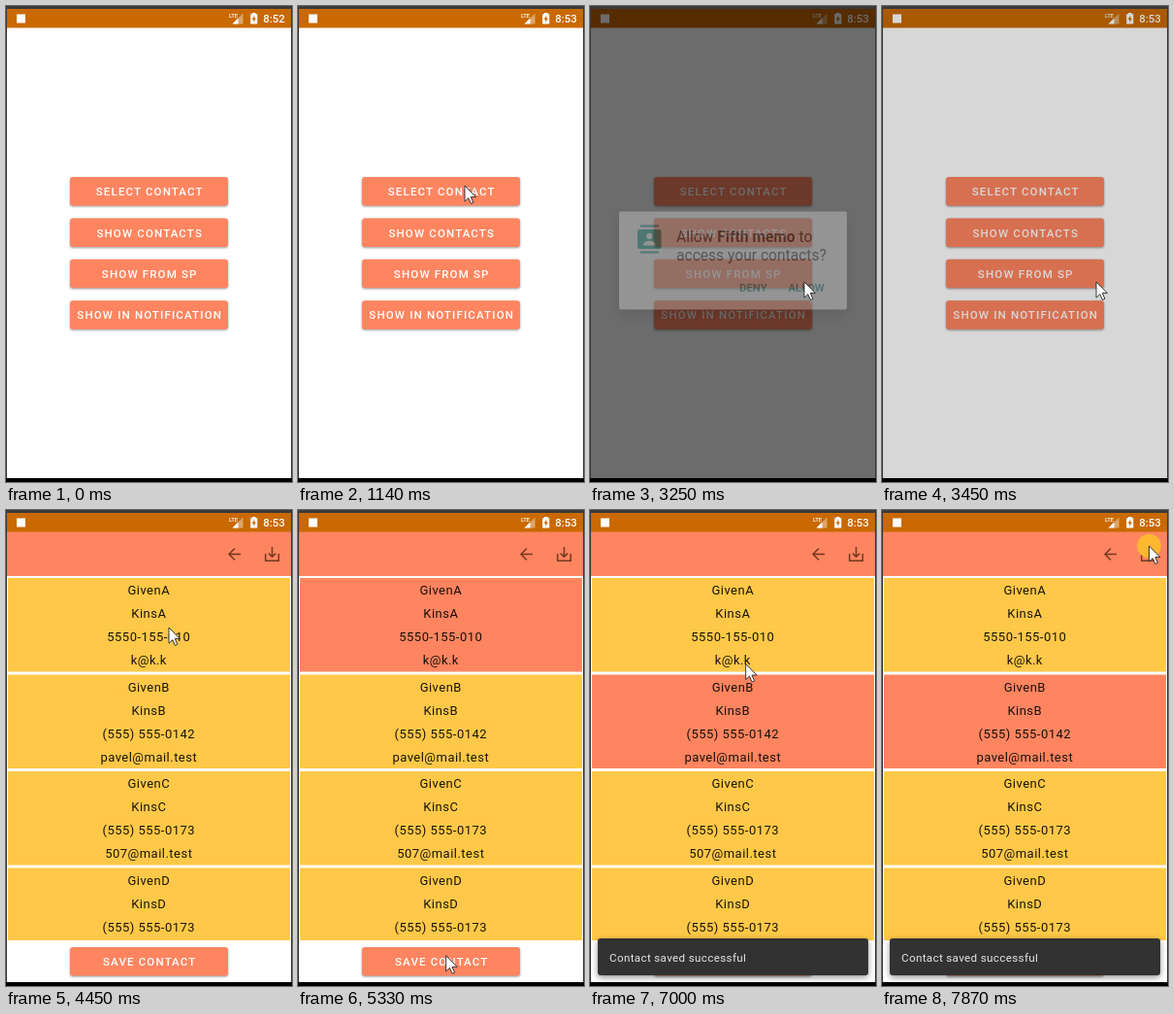
An HTML page that plays this animation: 295 px wide and 490 px high, repeating every 8 s.

```html
<!DOCTYPE html>
<html lang="en">
<head>
<meta charset="utf-8">
<title>Contact picker</title>
<style>
  html, body { margin: 0; width: 100%; height: 100%; overflow: hidden; background: #fff; }
  svg { display: block; width: 295px; height: 490px; font-family: Roboto, "Open Sans", sans-serif; }
  .btn rect { fill: #ff8560; filter: drop-shadow(0 1.2px 1px rgba(0, 0, 0, .4)); }
  .btn text { fill: #fff; font-size: 11.5px; font-weight: 500; letter-spacing: 1.16px; text-anchor: middle; }
  .row text { fill: #000; fill-opacity: .9; font-size: 13px; letter-spacing: .48px; text-anchor: middle; }
  .ask { font-size: 15.6px; fill: #212121; }
  .ask tspan { font-weight: 700; }
  .act { font-size: 11.3px; font-weight: 500; fill: #00857a; }
  .panel { fill: #fff; filter: drop-shadow(0 6px 7px rgba(0, 0, 0, .35)); }
  .bar { fill: #323232; filter: drop-shadow(0 2px 3px rgba(0, 0, 0, .45)); }
  .icon { fill: none; stroke: #74381f; stroke-width: 1.5; }
</style>
</head>
<body>
<svg viewBox="0 0 295 490">
  <defs>
    <clipPath id="listClip"><rect y="68" width="295" height="375"/></clipPath>
    <clipPath id="topClip"><rect x="66" y="176" width="163" height="29.5" rx="3"/></clipPath>
    <clipPath id="saveClip"><rect x="66" y="450" width="163" height="29.5" rx="3"/></clipPath>
  </defs>
  <rect width="295" height="490" fill="#fff"/>

  <g id="home">
    <g id="menu"></g>
    <g clip-path="url(#topClip)"><circle id="topRipple" cx="172" cy="185" fill="#fff"/></g>
  </g>

  <g id="contacts">
    <rect y="22" width="295" height="46" fill="#ff8560"/>
    <path class="icon" d="M242 45.5H230M236 39.5L230 45.5L236 51.5"/>
    <path class="icon" d="M267.7 45V52.3H281.3V45M274.5 38V48M270.8 44.6L274.5 48.3L278.2 44.6"/>
    <g id="list" clip-path="url(#listClip)"></g>
    <g id="save"></g>
    <g clip-path="url(#saveClip)"><circle id="saveRipple" cx="149" cy="466" fill="#fff"/></g>
    <g id="snack">
      <rect class="bar" x="8" y="441" width="279" height="38" rx="3"/>
      <text x="20" y="464.6" fill="#e6e6e6" font-size="11.6" letter-spacing=".36">Contact saved successful</text>
    </g>
  </g>

  <!-- status bar -->
  <rect y="3" width="295" height="19.5" fill="#c96900"/>
  <rect x="11" y="8.5" width="9" height="9" fill="#fff"/>
  <text x="230" y="12" fill="#fff" font-size="6" font-weight="500" letter-spacing="-.3">LTE</text>
  <path d="M244.5 7.5V18.5H233.5Z" fill="#fff" opacity=".4"/>
  <path d="M239.5 12.5V18.5H233.5Z" fill="#fff"/>
  <path d="M254 7H257.5V8.2H259.3V18.5H252.2V8.2H254Z" fill="#fff"/>
  <path d="M256.3 9.8L253.6 13.8H255.3V16.8L258 12.8H256.3Z" fill="#c96900"/>
  <text id="clock" x="287.8" y="17.2" fill="#fff" font-size="11.4" font-weight="500" text-anchor="end"></text>

  <rect id="dim" width="295" height="490"/>

  <g id="dialog">
    <rect class="panel" x="30" y="204" width="235" height="101" rx="2"/>
    <g fill="#009688">
      <path d="M52 218H71V220H52ZM52 245H71V247H52Z"/>
      <rect x="49" y="222.5" width="24.5" height="20" rx="2"/>
    </g>
    <circle cx="61.2" cy="229.5" r="3" fill="#fff"/>
    <path d="M55 239V237.5Q56 234.5 61.2 234.3Q66.5 234.5 67.5 237.5V239Z" fill="#fff"/>
    <text class="ask" x="89" y="235.6">Allow <tspan>Fifth memo</tspan> to</text>
    <text class="ask" x="89" y="254.6">access your contacts?</text>
    <text class="act" x="154" y="286.2">DENY</text>
    <text class="act" x="204.5" y="286.2">ALLOW</text>
  </g>

  <!-- window frame -->
  <path d="M0 0H295V490H0ZM1 3V486H294V3Z" fill="#3a3a3c" fill-rule="evenodd"/>
  <rect y="486" width="295" height="4"/>

  <circle id="press" r="12.3" fill="#fdbd2c" opacity=".92"/>
  <path id="cursor" d="M0 0V16.2L3.8 12.7L6.4 18.5L8.9 17.4L6.3 11.6H11.4Z"
        fill="#fff" stroke="#222" stroke-width=".9" stroke-linejoin="round"/>
</svg>
<script>
const LOOP = 8000;
const $ = id => document.getElementById(id);
const clamp = v => Math.max(0, Math.min(1, v));
const ramp = (t, a, b) => clamp((t - a) / (b - a));
const ease = p => p * p * (3 - 2 * p);
const set = (id, attrs) => { for (const k in attrs) $(id).setAttribute(k, attrs[k]); };
const show = (id, on) => set(id, { visibility: on ? "visible" : "hidden" });

const button = (label, y) => `<g class="btn">
  <rect x="66" y="${y}" width="163" height="29.5" rx="3"/>
  <text x="148.2" y="${y + 19.1}">${label}</text></g>`;

$("menu").innerHTML = ["SELECT CONTACT", "SHOW CONTACTS", "SHOW FROM SP", "SHOW IN NOTIFICATION"]
  .map((label, i) => button(label, 176 + i * 42.4)).join("");
$("save").innerHTML = button("SAVE CONTACT", 450);

const people = [
  ["GivenA", "KinsA", "5550-155-010", "k@k.k"],
  ["GivenB", "KinsB", "(555) 555-0142", "pavel@mail.test"],
  ["GivenC", "KinsC", "(555) 555-0173", "507@mail.test"],
  ["GivenD", "KinsD", "(555) 555-0173", ""]
];
$("list").innerHTML = people.map((lines, i) => {
  const y = 70 + i * 99.5;
  const text = lines.map((s, n) => `<text x="147.3" y="${y + 17 + n * 24.1}">${s}</text>`).join("");
  return `<g class="row"><rect id="row${i}" x="2" y="${y}" width="291" height="96.5"/>${text}</g>`;
}).join("");

// cursor tip: time, x, y
const path = [
  [390, 215, 442], [930, 172, 185], [1450, 172, 185], [2050, 206, 272],
  [2430, 206, 272], [2700, 221, 287], [2860, 221, 284], [3830, 221, 284],
  [4260, 168, 121], [4600, 168, 121], [5190, 160, 444], [5420, 149, 466],
  [6050, 149, 466], [6340, 129, 215], [6540, 126, 197], [6760, 126, 197],
  [7530, 275, 31], [7780, 275.5, 37]
];
const presses = [[1070, 1140], [2910, 2980], [4310, 4450], [5460, 5530], [6600, 6740], [7870, 8000]];

function tip(t) {
  const i = path.findIndex(p => p[0] > t);
  if (i < 0) return path[path.length - 1].slice(1);
  if (i === 0) return path[0].slice(1);
  const [a, b] = [path[i - 1], path[i]];
  const p = ease(ramp(t, a[0], b[0]));
  return [a[1] + (b[1] - a[1]) * p, a[2] + (b[2] - a[2]) * p];
}

function ripple(id, t, start) {
  set(id, {
    r: 10 + 130 * ramp(t, start, start + 260),
    opacity: t < start ? 0 : .24 * (1 - ramp(t, start + 200, start + 440))
  });
}

function draw(t) {
  const listOpen = t >= 3580;
  show("home", !listOpen);
  show("contacts", listOpen);
  $("clock").textContent = t < 390 ? "8:52" : "8:53";

  ripple("topRipple", t, 1400);
  ripple("saveRipple", t, 5540);

  set("dim", { opacity: .6 * ramp(t, 2120, 2250) * (1 - ramp(t, 3240, 3526)) });
  const enter = ramp(t, 2050, 2150), leave = ramp(t, 3160, 3285);
  set("dialog", {
    opacity: enter * (1 - leave),
    transform: `translate(0 ${14 * ((1 - enter) ** 4 + leave ** 2)})`
  });

  const picked = t < 4580 ? -1 : t < 6870 ? 0 : 1;
  people.forEach((_, i) => set("row" + i, { fill: i === picked ? "#ff8560" : "#ffc848" }));

  const snack = ramp(t, 6060, 6230), size = .8 + .2 * ease(snack);
  set("snack", {
    opacity: snack,
    transform: `translate(147.5 460) scale(${size}) translate(-147.5 -460)`
  });

  const [x, y] = tip(t);
  show("cursor", t >= 390);
  set("cursor", { transform: `translate(${x} ${y})` });
  show("press", presses.some(([a, b]) => t >= a && t < b));
  set("press", { cx: x, cy: y });
}

function tick() {
  draw(performance.now() % LOOP);
  requestAnimationFrame(tick);
}
tick();
</script>
</body>
</html>
```
